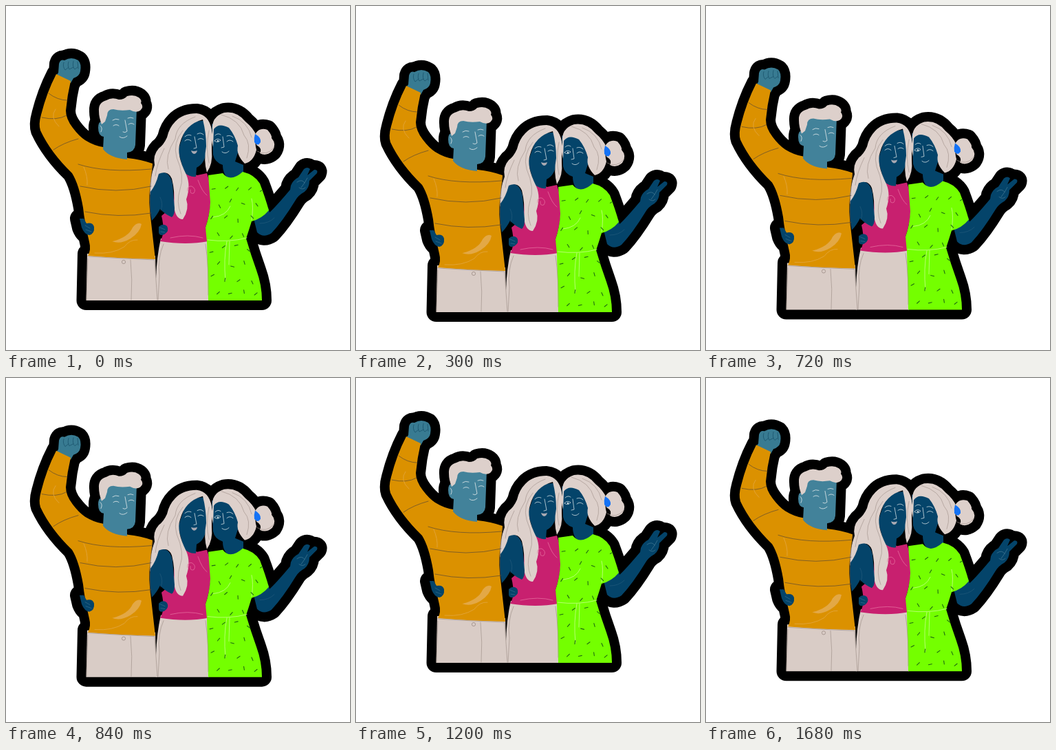
Recreate the animation shown at these times as an HTML page. Size 500 by 500 pixels, loop 1.74 s.

```html
<!DOCTYPE html>
<html lang="en">
<head>
<meta charset="utf-8">
<title>Three friends</title>
<style>
  html, body { margin: 0; width: 100%; height: 100%; overflow: hidden; background: #fff; }
  svg { display: block; width: 100%; height: 100%; }
</style>
</head>
<body>
<svg viewBox="0 0 500 500">
  <defs><clipPath id="dressClip"><path id="dressShape"/></clipPath></defs>
  <g id="group"></g>
</svg>
<script>
const LOOP = 1740, STEP = 60;
const KEYS = [[0, 0], [480, 27.2], [1210, -14.5], [LOOP, 0]];

const C = {
  amber: '#db9100', patch: '#e3a846', teal: '#387b92', face: '#42829a', navy: '#04446a',
  hair: '#ddd0cb', pants: '#d9ccc6', pink: '#c8206f', green: '#74ff00', blue: '#1472f5',
  dark: '#5b4a35', pale: '#d3dfe3', seam: '#a3948d', tick: '#1c6a12'
};

const group = document.getElementById('group');

function add(tag, attrs) {
  const el = document.createElementNS('http://www.w3.org/2000/svg', tag);
  for (const k in attrs) el.setAttribute(k, attrs[k]);
  return group.appendChild(el);
}
const fill = (d, color) => add('path', { d, fill: color });
const line = (d, color, width = 0.8) => add('path', {
  d, fill: 'none', stroke: color, 'stroke-width': width, 'stroke-linecap': 'round', 'stroke-linejoin': 'round'
});

const dress = 'M294 246L315 243Q326 257 344 241Q361 245 369 258Q377 279 382 297Q372 309 357 313Q353 326 349 338Q356 362 364 384Q372 406 372 428H294L292 343L290 322Q296 305 297 285Z';
document.getElementById('dressShape').setAttribute('d', dress);

// Body parts, back to front
const parts = [
  ['M360 309L381 293L383 300Q392 292 413 267L414 261Q417 253 425 249L433 237Q438 233 442 237L438 246L448 238Q454 238 452 243L441 254Q441 264 434 270Q425 275 421 282Q402 313 386 330Q374 338 365 329Z', C.navy],
  ['M116.500 428L118 360L217 363L219 428Z', C.pants],
  ['M225 338L293 338L295 428H218V396Q219 364 225 338Z', C.pants],
  ['M76 97L77 84Q79 77 85 79Q95 73 105 79Q110 84 108 95Q107 102 98 105L94 112L73 101Z', C.teal],
  ['M73 99L94 109Q89 130 87 152Q87 164 97 177Q106 189 115 195Q128 203 141 205L177 221Q196 223 213 229L211 250Q207 275 209 297L217 368Q165 367 119 363Q124 354 121 343Q114 313 112 293Q106 259 96 243Q65 213 50 181Q47 172 51 158Q59 126 73 99Z', C.amber],
  ['M140 168Q134 167 134 177Q134 189 142 190L141 208Q151 221 176 223L176 213Q187 212 188 202L190 148L148 147Z', C.face],
  ['M139 172Q135 162 135 153Q134 140 146 137Q154 132 164 136Q172 136 176 131Q186 128 193 133Q198 137 196 141Q201 147 195 152Q189 156 180 151Q166 153 156 150Q147 150 147 159L144 168Z', C.hair],
  ['M107 309L113 309L117 316Q126 314 128 321Q129 331 121 333Q114 332 110 322Z', C.navy],
  ['M244 249L260 240L278 246L292 243Q297 257 298 277Q297 302 290 322L294 342Q262 348 224 342Q232 330 226 305L244 290Z', C.pink],
  ['M260 180Q275 163 292 168L291 212Q289 229 277 235L276 248Q267 249 259 242L250 210Z', C.navy],
  ['M299 172Q318 160 334 178L338 210L333 226L345 231V242Q335 253 327 253Q315 247 315 231Q303 227 301 216Z', C.navy],
  [dress, C.green],
  ['M277 156Q257 156 246 168Q237 177 234 191Q229 202 222 207Q213 217 216 231Q208 252 209 275Q217 266 222 246Q235 237 241 251Q246 271 244 290Q246 310 257 310Q267 295 262 281Q269 261 262 245Q247 215 253 199Q260 172 286 165Q291 185 291 204Q287 225 292 242Q301 229 299 210L299 180Q295 158 277 156Z', C.hair],
  ['M300 181Q298 161 317 155Q335 152 348 168Q359 177 364 188Q361 200 364 209Q360 226 347 229Q334 216 337 203Q333 188 324 177Q309 169 302 179L301 205Q297 192 300 181Z', C.hair],
  ['M363 185Q369 176 380 180Q387 188 386 192Q394 201 387 211Q378 219 369 214Q373 207 364 202Z', C.hair],
  ['M222 244Q237 237 242 258L245 294Q245 304 241 307Q230 302 224 295Q219 305 212 312Q207 287 210 270Q218 260 222 244Z', C.navy],
  ['M222 321Q228 315 234 320Q238 327 230 332Q223 335 222 329Z', C.navy]
];

// Thick black sticker edge
const edge = parts.map(p => p[0]).join('');
add('path', { d: edge, fill: '#000', stroke: '#000', 'stroke-width': 28, 'stroke-linejoin': 'round' });
parts.forEach(p => fill(...p));

// Sweater
fill('M155 342Q178 336 184 322Q191 313 197 317Q195 329 181 338Q166 347 154 342Z', C.patch);
line('M62 127Q75 137 89 137M52 162Q74 167 88 159M69 209Q83 199 105 193M105 230Q145 243 211 237M108 262Q160 274 211 262M115 299Q163 309 211 301M214 231Q207 263 210 306', C.dark, 0.7);
line('M113 234Q119 248 118 260M129 359Q155 361 172 350Q180 339 191 340M72 150Q63 162 77 175', C.patch);

// Trousers
line('M119 364Q165 367 216 369M119 367L117 427M181 369Q184 398 182 427M216 370L220 427M229 346Q220 366 223 392L221 427M290 346Q295 380 294 420', C.seam, 0.7);
add('circle', { cx: 171, cy: 372, r: 2.6, fill: 'none', stroke: C.seam, 'stroke-width': 0.9 });

// Hands
line('M84 82Q82 88 86 93L91 89M91 81Q89 88 92 92L98 89M98 80Q96 89 100 92L104 89M104 81L105 91', '#1f5871', 0.9);
line('M423 256Q430 251 434 257L429 264M434 257L438 250M426 264Q431 268 435 264', '#477b96', 0.7);
line('M115 319L122 323M116 325L124 328M224 322L231 325M225 328L231 329', '#386d8d', 0.7);
line('M224 278Q229 288 225 297M369 316Q382 316 390 308', '#235b7c', 0.7);

// Faces
line('M155 166Q159 163 164 165M177 163Q181 161 185 163M156 174Q160 171 164 174M178 172Q182 169 186 172M173 166L176 182Q173 185 170 183M165 190Q170 194 176 189M137 174Q141 177 138 183', C.pale, 0.9);
line('M260 190Q264 186 269 188M278 186Q283 183 287 187M260 196Q264 192 269 196M279 194Q283 191 287 194M274 190L277 206L273 207', C.pale, 0.8);
fill('M269 210Q273 212 278 210Q277 215 273 215Q270 214 269 210Z', '#a9a9b2');
line('M304 188Q308 184 312 187M321 189Q326 187 330 191M321 197Q325 193 330 197M315 190L317 205L313 206M314 212Q319 216 324 211M303 196Q307 191 312 195Q308 200 303 196', C.pale, 0.8);
add('circle', { cx: 308, cy: 196, r: 1.2, fill: C.pale });

// Hair strands
line('M275 161Q248 171 246 193Q230 218 236 237M257 181Q242 199 248 220Q260 248 253 266Q247 285 254 302M230 207Q219 230 217 247M295 181Q290 206 295 228', C.seam, 0.65);
line('M313 158Q340 165 346 188Q357 200 350 221M329 160Q352 168 357 191M365 211Q379 219 389 206', C.seam, 0.65);
fill('M362 186Q371 191 370 198Q366 205 361 198Q360 192 362 186Z', C.blue);

// Top and dress
line('M264 269Q263 261 270 262Q277 266 273 272Q267 274 268 267M279 253Q285 270 292 275M239 337Q265 331 286 337', '#e56c9e', 0.8);
line('M293 340Q324 344 350 337M321 342Q316 368 319 399M325 342L324 376M357 311Q360 292 357 280M301 307Q320 305 326 291', '#c6ff8c', 0.8);

const rand = n => { const v = Math.sin(n * 91.7 + 4) * 4375.5; return v - Math.floor(v); };
let ticks = '';
for (let i = 0; i < 40; i++) {
  const row = Math.floor(i / 5);
  const x = 298 + i % 5 * 18 + row % 2 * 8 + rand(i) * 6;
  const y = 258 + row * 22 + rand(i + 80) * 12;
  const a = rand(i + 160) * Math.PI;
  const dx = 2.5 * Math.cos(a), dy = 2.5 * Math.sin(a);
  ticks += `M${x - dx} ${y - dy}L${x + dx} ${y + dy}`;
}
line(ticks, C.tick, 1.1).setAttribute('clip-path', 'url(#dressClip)');

function offset(t) {
  const i = KEYS.findIndex(k => k[0] > t);
  const [t0, y0] = KEYS[i - 1], [t1, y1] = KEYS[i];
  return y0 + (y1 - y0) * (t - t0) / (t1 - t0);
}

const start = performance.now();
function draw(now) {
  const t = Math.max(0, now - start) % LOOP;
  const held = Math.floor(t / STEP) * STEP;
  group.setAttribute('transform', `translate(0 ${offset(held).toFixed(2)})`);
  requestAnimationFrame(draw);
}
draw(start);
</script>
</body>
</html>
```
